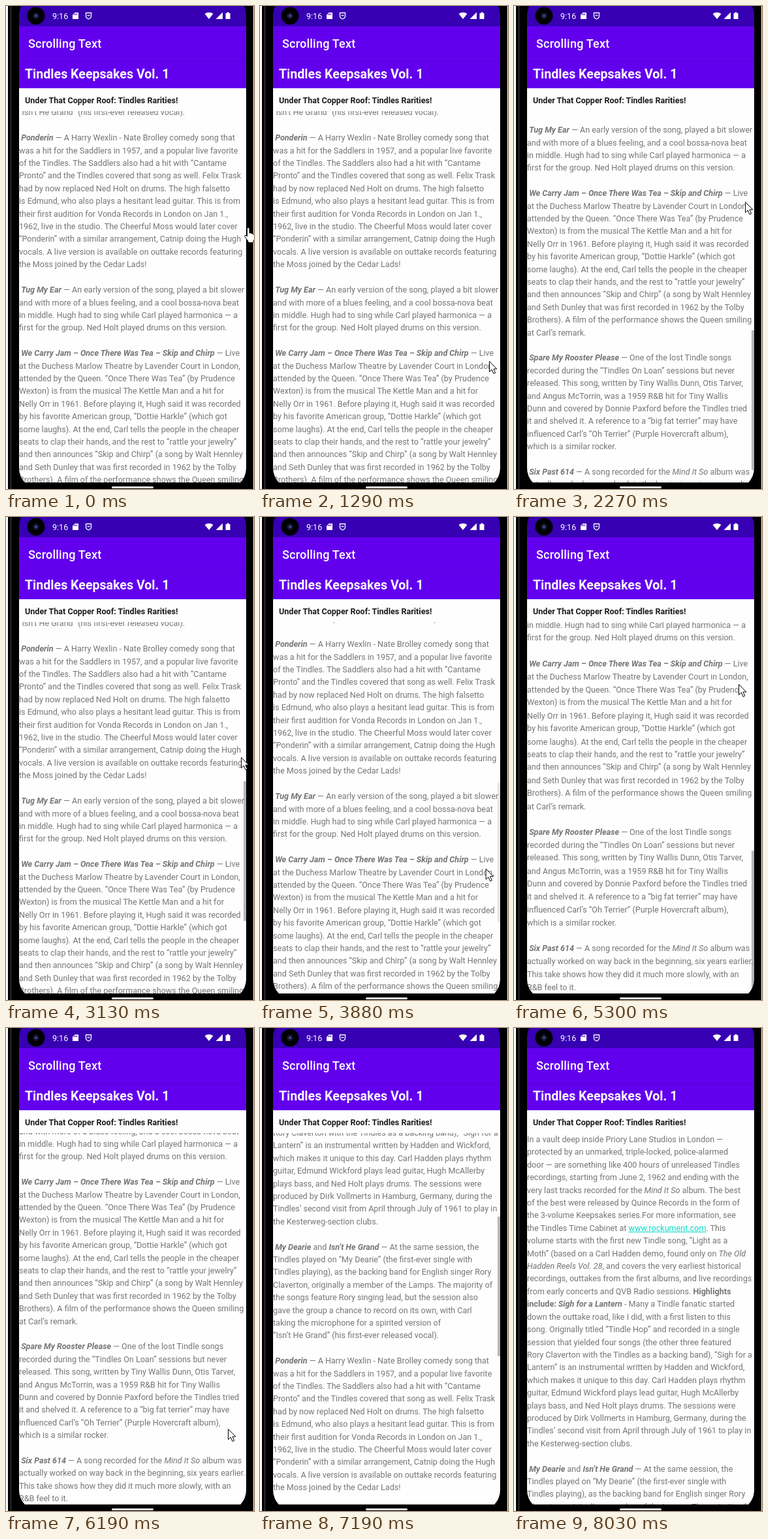
An HTML page that plays this animation: 380x740 px, repeating every 8740 ms.

```html
<!DOCTYPE html>
<html lang="en">
<head>
<meta charset="utf-8">
<title>Scrolling Text</title>
<style>
html, body { margin: 0; width: 100%; height: 100%; overflow: hidden; background: #fff; }
#stage { position: relative; width: 380px; height: 740px; overflow: hidden; font-family: Roboto, sans-serif; }
#stage div, #stage svg { position: absolute; }
#phone { left: 3px; top: 0; width: 376px; height: 740px; background: #000; }
#phone::before { content: ""; position: absolute; left: 4px; top: 0; width: 1px; height: 100%; background: #4a4a4a; }
#screen { left: 20px; top: -18px; width: 348px; height: 758px; border-radius: 32px; overflow: hidden; background: #000; }
#inner { left: 0; top: 18px; width: 348px; height: 740px; }
#inner > div { left: 0; width: 100%; white-space: pre; box-sizing: border-box; }
#status { top: 0; height: 31px; background: #3700b3; }
#clock { left: 51px; top: 0; line-height: 31px; font-size: 12.57px; color: #fff; }
#bar { top: 31px; height: 53px; background: #6200ee; color: #fff; padding-left: 14px; font: 500 18px/54px Roboto, sans-serif; letter-spacing: .22px; }
#head { top: 84px; height: 42px; background: linear-gradient(#5a00db, #6200ee 3px); color: #fff; padding-left: 9px; font: 700 19.6px/42px Roboto, sans-serif; }
#sub { top: 126px; height: 35px; background: #fefefe; color: #1c1c1c; padding-left: 9px; font: 700 12.57px/37px Roboto, sans-serif; }
#view { top: 161px; height: 569px; overflow: hidden; background: #fefefe; }
#sheet { left: 0; top: 0; width: 100%; height: 569px; transform-origin: 0 100%; }
#text { left: 0; top: 0; font-size: 12.57px; line-height: 19.4px; color: #757575; white-space: pre; }
#text u { color: #03dac5; }
#thumb { right: 0; top: 0; width: 4px; height: 214px; background: rgba(0, 0, 0, .28); }
#home { left: 162px; top: 736px; width: 64px; height: 3px; border-radius: 2px; background: #e4e4e4; }
#arrow, #hand { left: 0; top: 0; overflow: visible; fill: #fff; stroke: #000; stroke-linejoin: round; }
</style>
</head>
<body>
<div id="stage">
  <div id="phone"></div>
  <div id="screen"><div id="inner">
    <div id="status"><div id="clock">9:16</div></div>
    <div id="bar">Scrolling Text</div>
    <div id="head">Tindles Keepsakes Vol. 1</div>
    <div id="sub">Under That Copper Roof: Tindles Rarities!</div>
    <div id="view"><div id="sheet"><div id="text">In a vault deep inside Priory Lane Studios in London —
protected by an unmarked, triple-locked, police-alarmed
door — are something like 400 hours of unreleased Tindles
recordings, starting from June 2, 1962 and ending with the
very last tracks recorded for the <i>Mind It So</i> album. The best
of the best were released by Quince Records in the form of
the 3-volume Keepsakes series.For more information, see
the Tindles Time Cabinet at <u>www.rockument.com</u>. This
volume starts with the first new Tindle song, “Light as a
Moth” (based on a Carl Hadden demo, found only on <i>The Old</i>
<i>Hadden Reels Vol. 28</i>, and covers the very earliest historical
recordings, outtakes from the first albums, and live recordings
from early concerts and QVB Radio sessions. <b>Highlights</b>
<b>include: <i>Sigh for a Lantern</i></b> - Many a Tindle fanatic started
down the outtake road, like I did, with a first listen to this
song. Originally titled “Tindle Hop” and recorded in a single
session that yielded four songs (the other three featured
Rory Claverton with the Tindles as a backing band), “Sigh for a
Lantern” is an instrumental written by Hadden and Wickford,
which makes it unique to this day. Carl Hadden plays rhythm
guitar, Edmund Wickford plays lead guitar, Hugh McAllerby
plays bass, and Ned Holt plays drums. The sessions were
produced by Dirk Vollmerts in Hamburg, Germany, during the
Tindles’ second visit from April through July of 1961 to play in
the Kesterweg-section clubs.

 <b><i>My Dearie</i></b> and <b><i>Isn’t He Grand</i></b> — At the same session, the
Tindles played on “My Dearie” (the first-ever single with
Tindles playing), as the backing band for English singer Rory
Claverton, originally a member of the Lamps. The majority of
the songs feature Rory singing lead, but the session also
gave the group a chance to record on its own, with Carl
taking the microphone for a spirited version of
“Isn’t He Grand” (his first-ever released vocal).

 <b><i>Ponderin</i></b> — A Harry Wexlin - Nate Brolley comedy song that
was a hit for the Saddlers in 1957, and a popular live favorite
of the Tindles. The Saddlers also had a hit with “Cantame
Pronto” and the Tindles covered that song as well. Felix Trask
had by now replaced Ned Holt on drums. The high falsetto
is Edmund, who also plays a hesitant lead guitar. This is from
their first audition for Vonda Records in London on Jan 1.,
1962, live in the studio. The Cheerful Moss would later cover
“Ponderin” with a similar arrangement, Catnip doing the Hugh
vocals. A live version is available on outtake records featuring
the Moss joined by the Cedar Lads!

 <b><i>Tug My Ear</i></b> — An early version of the song, played a bit slower
and with more of a blues feeling, and a cool bossa-nova beat
in middle. Hugh had to sing while Carl played harmonica — a
first for the group. Ned Holt played drums on this version.

 <b><i>We Carry Jam – Once There Was Tea – Skip and Chirp</i></b> — Live
at the Duchess Marlow Theatre by Lavender Court in London,
attended by the Queen. “Once There Was Tea” (by Prudence
Wexton) is from the musical The Kettle Man and a hit for
Nelly Orr in 1961. Before playing it, Hugh said it was recorded
by his favorite American group, “Dottie Harkle” (which got
some laughs). At the end, Carl tells the people in the cheaper
seats to clap their hands, and the rest to “rattle your jewelry”
and then announces “Skip and Chirp” (a song by Walt Hennley
and Seth Dunley that was first recorded in 1962 by the Tolby
Brothers). A film of the performance shows the Queen smiling
at Carl’s remark.

 <b><i>Spare My Rooster Please</i></b> — One of the lost Tindle songs
recorded during the “Tindles On Loan” sessions but never
released. This song, written by Tiny Wallis Dunn, Otis Tarver,
and Angus McTorrin, was a 1959 R&amp;B hit for Tiny Wallis
Dunn and covered by Donnie Paxford before the Tindles tried
it and shelved it. A reference to a “big fat terrier” may have
influenced Carl’s “Oh Terrier” (Purple Hovercraft album),
which is a similar rocker.

 <b><i>Six Past 614</i></b> — A song recorded for the <i>Mind It So</i> album was
actually worked on way back in the beginning, six years earlier.
This take shows how they did it much more slowly, with an
R&amp;B feel to it.</div><div id="thumb"></div></div></div>
  </div></div>
  <svg width="380" height="32" style="left:0;top:0">
    <circle cx="46" cy="15" r="13.5" fill="#000"/>
    <circle cx="46" cy="15" r="5" fill="#15152e"/>
    <circle cx="46" cy="15" r="2" fill="#4a4f8c"/>
    <g fill="#fff">
      <path d="M105.5 10H111V20H102V13.5Z"/>
      <path d="M304.500 12Q311 7.500 317.500 12L311 20Z"/>
      <path d="M332 9.500V20H321.500Z"/>
      <path d="M336.500 11H338.500V9.500H341.500V11H343.500V20H336.500Z"/>
    </g>
    <path d="M104.500 11.500V14M106.500 11.500V14M108.500 11.500V14" stroke="#3700b3"/>
    <path d="M122.500 10.500H130.500V16Q130 19 126.500 20Q123 19 122.500 16ZM124.500 14.500H128.500" fill="none" stroke="#fff" stroke-width="1.300"/>
  </svg>
  <div id="home"></div>
  <svg id="arrow" width="13" height="20"><path d="M.5 .5V16.500L4.300 13L7 19.300L9.700 18.100L7 12H11.800Z"/></svg>
  <svg id="hand" width="16" height="24"><path d="M4.500 14V2.500Q4.500 .5 6.200 .5T8 2.500V9Q10.500 7.500 11 9.700Q13.300 8.700 13.700 10.900Q15.800 10.300 15.800 12.500V16.500Q15.500 19.500 14 21V23.500H6V21.500L1 14.500Q.2 12.500 2 12.200Q3 12.200 4.500 14Z"/></svg>
</div>
<script>
const LOOP = 8740, VIEW = 569, TOTAL = 78 * 19.4, END = TOTAL - VIEW;
const $ = id => document.getElementById(id);

// start, end, number of steps, then the state reached:
// pointer x, pointer y, scroll offset, stretch, scrollbar opacity
const moves = [
  [0, 0, 1, 365, 339, 648, 1, 0],
  [130, 280, 2, 384, 291, 648, 1, 0],
  [500, 500, 1, 380, 108, 648, 1, 0],
  [710, 1290, 5, 351, 544, 648, 1, 0],
  [1720, 2270, 5, 354, 300, 893, 1, 1],
  [2560, 2710, 2, 355, 330, 740, 1, 1],
  [2980, 3130, 2, 360, 368, 648.5, 1, 1],
  [3280, 3430, 2, 359, 362, 655, 1, 1],
  [3730, 4010, 3, 339, 627, 655, 1, 0],
  [4280, 4430, 2, 358, 204, END, 1.009, 1],
  [4550, 5300, 6, 344, 256, END, 1.022, 1],
  [5420, 5677, 3, 368, 420, END, 1, 1],
  [5805, 6190, 4, 340, 614, END, 1, 0],
  [7040, 7610, 5, 400, 614, 0, 1, 1],
  [7880, 8030, 2, 400, 614, 0, 1, 0]
];

function stateAt(t) {
  let i = moves.length - 1;
  while (t < moves[i][0]) i--;
  const [start, end, steps, ...to] = moves[i];
  const from = moves[Math.max(0, i - 1)].slice(3);
  const step = steps > 1 ? Math.floor((t - start) / (end - start) * (steps - 1) + 1e-6) : 0;
  const f = Math.min(1, (step + 1) / steps);
  const mix = (k, p = f) => from[k] + (to[k] - from[k]) * p;
  return { x: mix(0), y: mix(1), scroll: mix(2, f * (2 - f)), stretch: mix(3), bar: to[4] || mix(4) };
}

function draw() {
  const t = performance.now() % LOOP, s = stateAt(t);
  $('text').style.transform = `translateY(${-s.scroll}px)`;
  $('thumb').style.transform = `translateY(${s.scroll * VIEW / TOTAL}px)`;
  $('thumb').style.opacity = s.bar;
  $('sheet').style.transform = `scaleY(${s.stretch})`;
  const active = t < 500 ? 'hand' : t < 7040 ? 'arrow' : '';
  for (const id of ['hand', 'arrow']) {
    $(id).style.display = id === active ? 'block' : 'none';
    $(id).style.transform = `translate(${s.x}px, ${s.y}px)`;
  }
  requestAnimationFrame(draw);
}
draw();
</script>
</body>
</html>
```
